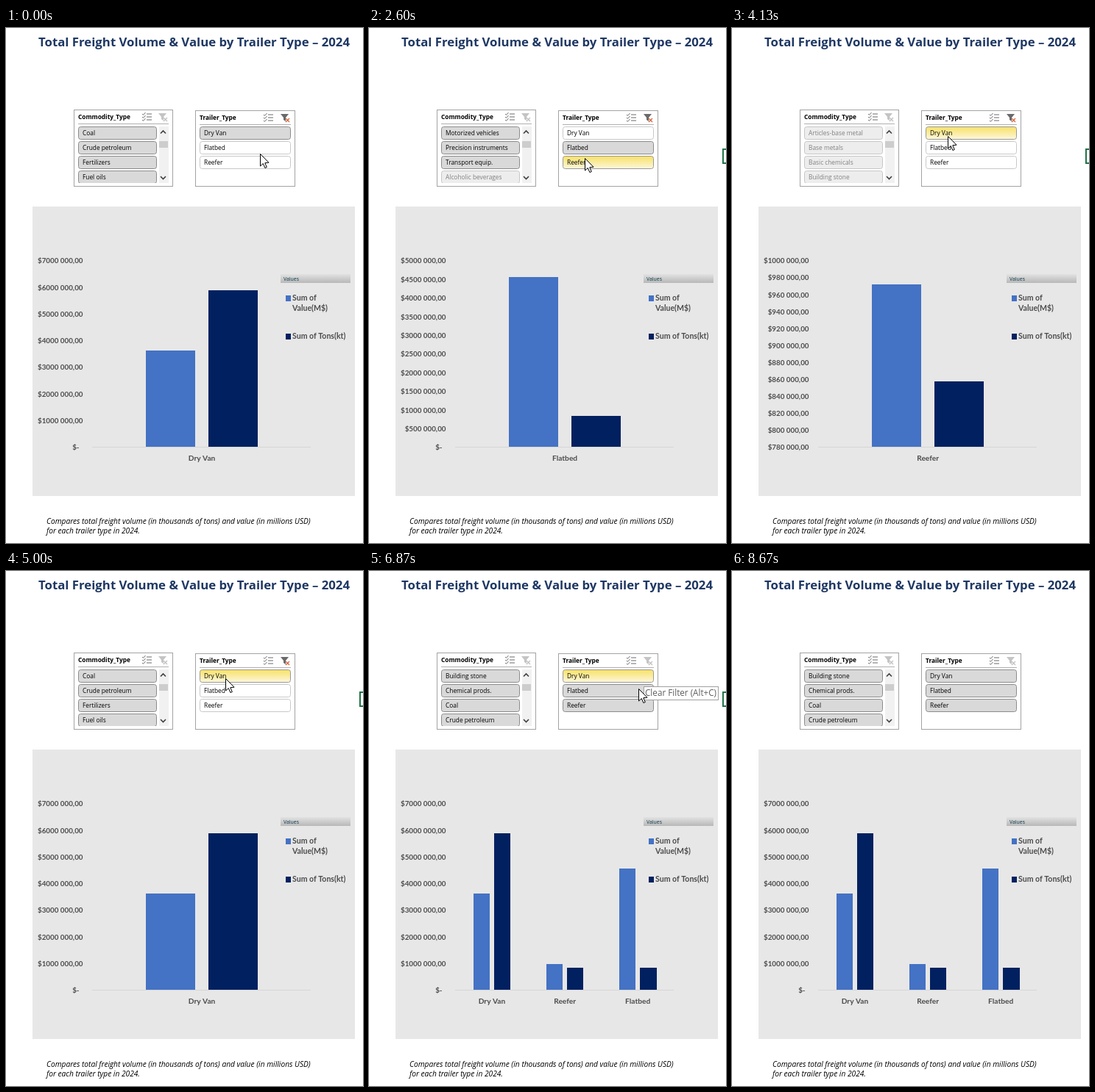
Animation, 485 px wide and 701 px high, one loop 9 s. Source, as an HTML page with a canvas:

```html
<!DOCTYPE html>
<html lang="en">
<head>
<meta charset="utf-8">
<title>Freight by trailer type</title>
<style>
html, body { margin: 0; width: 100%; height: 100%; overflow: hidden; background: #fff; }
canvas { display: block; width: 485px; height: 701px; }
</style>
</head>
<body>
<canvas id="stage"></canvas>
<script>
const W = 485, H = 701, LOOP = 9000, FPS = 15;
const canvas = document.getElementById('stage');
const ctx = canvas.getContext('2d');
const dpr = window.devicePixelRatio || 1;
canvas.width = W * dpr;
canvas.height = H * dpr;

const SANS = '"Open Sans", "Noto Sans", sans-serif';
const CHART = 'Lato, "Open Sans", sans-serif';
const BLUE = '#4472c4', NAVY = '#002060';
const TYPES = ['Dry Van', 'Flatbed', 'Reefer'];

// Values in thousands: [value, tons]
const SUMS = { 'Dry Van': [3624, 5884], Flatbed: [4557, 837], Reefer: [972, 857.5] };

const VIEWS = {
  dry: { cats: ['Dry Van'], min: 0, max: 7000, step: 1000, active: 4,
    goods: ['Coal', 'Crude petroleum', 'Fertilizers', 'Fuel oils'] },
  flat: { cats: ['Flatbed'], min: 0, max: 5000, step: 500, active: 3,
    goods: ['Motorized vehicles', 'Precision instruments', 'Transport equip.', 'Alcoholic beverages'] },
  reefer: { cats: ['Reefer'], min: 780, max: 1000, step: 20, active: 0,
    goods: ['Articles-base metal', 'Base metals', 'Basic chemicals', 'Building stone'] },
  all: { cats: ['Dry Van', 'Reefer', 'Flatbed'], min: 0, max: 7000, step: 1000, active: 4,
    goods: ['Building stone', 'Chemical prods.', 'Coal', 'Crude petroleum'] }
};

// Each click: tick, chosen types, resulting view (shown three ticks later)
const CLICKS = [
  { at: -9, pick: [0], view: 'dry' },
  { at: 21, pick: [1], view: 'flat' },
  { at: 43, pick: [2], view: 'reefer' },
  { at: 60, pick: [0], view: 'dry' },
  { at: 89, pick: [0, 1, 2], view: 'all' }
];

// Pointer stops: tick, x, y, eased
const PATH = [
  [0, 345, 171], [12, 293, 161, 1], [35, 293, 161], [38, 293, 177, 1],
  [50, 293, 177], [57, 293, 147, 1], [73, 293, 147], [87, 377, 123, 1],
  [100, 377, 123], [103, 366, 160], [119, 236, 676]
];
const POINTER_GONE = 120;

const lastClick = n => CLICKS.filter(c => c.at <= n).pop();

function pointerAt(n) {
  if (n <= 0) return { x: PATH[0][1], y: PATH[0][2] };
  for (let i = 1; i < PATH.length; i++) {
    const [a, ax, ay] = PATH[i - 1], [b, bx, by, eased] = PATH[i];
    if (n > b) continue;
    let k = (n - a) / (b - a);
    if (eased) k = k * k * (3 - 2 * k);
    return { x: ax + (bx - ax) * k, y: ay + (by - ay) * k };
  }
  return { x: -99, y: -99 };
}

function text(str, x, y, font, color, align = 'left') {
  ctx.font = font;
  ctx.fillStyle = color;
  ctx.textAlign = align;
  ctx.fillText(str, x, y);
}

function rect(x, y, w, h, color) {
  ctx.fillStyle = color;
  ctx.fillRect(x, y, w, h);
}

function frame(x, y, w, h, color) {
  ctx.strokeStyle = color;
  ctx.lineWidth = 1;
  ctx.strokeRect(x + 0.5, y + 0.5, w - 1, h - 1);
}

function line(points, color, width = 1) {
  ctx.beginPath();
  points.forEach(([x, y]) => ctx.lineTo(x, y));
  ctx.strokeStyle = color;
  ctx.lineWidth = width;
  ctx.stroke();
}

function polygon(points, color) {
  ctx.beginPath();
  points.forEach(([x, y]) => ctx.lineTo(x, y));
  ctx.closePath();
  ctx.fillStyle = color;
  ctx.fill();
}

function fade(y0, y1, from, to) {
  const g = ctx.createLinearGradient(0, y0, 0, y1);
  g.addColorStop(0, from);
  g.addColorStop(1, to);
  return g;
}

const LOOKS = {
  on: ['#d9d9d9', '#8c8c8c', '#000'],
  off: ['#fff', '#c8c8c8', '#000'],
  empty: ['#ededed', '#c6c6c6', '#808080'],
  hover: [null, '#999', '#000']
};

function button(label, x, y, w, look) {
  const [fill, edge, ink] = LOOKS[look];
  ctx.beginPath();
  ctx.roundRect(x + 0.5, y + 0.5, w - 1, 17, 3);
  ctx.fillStyle = fill || fade(y, y + 18, '#f8e162', '#fcf7e0');
  ctx.fill();
  ctx.strokeStyle = edge;
  ctx.lineWidth = 1;
  ctx.stroke();
  text(label, x + 6, y + 12, '8.35px ' + SANS, ink);
}

function checklistIcon(x, y) {
  for (let i = 0; i < 3; i++) {
    const cy = y + 2 + i * 4;
    line([[x, cy], [x + 1.5, cy + 1.3], [x + 4.5, cy - 2]], '#6a6a6a');
    rect(x + 6, cy - 0.5, 7, 1, '#6a6a6a');
  }
}

function funnelIcon(x, y, enabled) {
  const body = enabled ? '#6a6a6a' : '#c4c4c4', cross = enabled ? '#d86a45' : '#c4c4c4';
  polygon([[x, y], [x + 11, y], [x + 7, y + 5], [x + 7, y + 10], [x + 4, y + 8], [x + 4, y + 5]], body);
  line([[x + 7, y + 6], [x + 12, y + 11]], cross, 1.4);
  line([[x + 12, y + 6], [x + 7, y + 11]], cross, 1.4);
}

function slicer(title, x, y, w, h) {
  rect(x, y, w, h, '#fff');
  frame(x, y, w, h, '#a3a3a3');
  text(title, x + 6, y + 13, 'bold 8.3px ' + SANS, '#000');
  rect(x + 6, y + 19, w - 12, 1, '#b0b0b0');
  checklistIcon(x + 93, y + 4);
}

function goodsSlicer(view) {
  slicer('Commodity_Type', 92, 111, 135, 105);
  funnelIcon(207, 116, false);
  ctx.save();
  ctx.beginPath();
  ctx.rect(93, 132, 133, 79);
  ctx.clip();
  view.goods.forEach((g, i) => button(g, 98, 134 + i * 20, 107, i < view.active ? 'on' : 'empty'));
  ctx.restore();
  rect(208, 134, 13, 77, '#f1f1f1');
  rect(208, 154, 12, 9, '#cdcdcd');
  line([[210, 143.5], [213.5, 140], [217, 143.5]], '#404040', 1.6);
  line([[210, 202], [213.5, 205.5], [217, 202]], '#404040', 1.6);
}

function typeSlicer(n, picked, filtered) {
  slicer('Trailer_Type', 257, 112, 136, 104);
  const p = pointerAt(n);
  if (filtered && p.x >= 370 && p.x < 387 && p.y >= 114 && p.y < 130) {
    rect(370, 114, 17, 16, fade(114, 130, '#f9e48a', '#fff0b8'));
    frame(370, 114, 17, 16, '#a8a083');
  }
  funnelIcon(373, 117, filtered);
  // Hover trails the pointer by one tick
  const q = pointerAt(n - 1);
  TYPES.forEach((name, i) => {
    const y = 134 + i * 20;
    const over = q.x >= 263 && q.x < 387 && q.y >= y && q.y < y + 17;
    button(name, 263, y, 124, over ? 'hover' : picked.includes(i) ? 'on' : 'off');
  });
}

function money(v) {
  return v ? '$' + v + ' 000,00' : '$-';
}

function chart(view) {
  const base = 570.75, span = 254, ink = '#4c4c4c';
  rect(36, 243, 438, 394, '#e7e7e7');
  const yOf = v => base - (v - view.min) / (view.max - view.min) * span;

  for (let v = view.min; v <= view.max; v += view.step)
    text(money(v), v ? 104.5 : 99.5, yOf(v) + 3.6, 'bold 9.8px ' + CHART, ink, 'right');

  rect(117, 570, 297, 1, '#d6d6d6');
  const many = view.cats.length > 1;
  const slot = 297.3 / view.cats.length;
  const barW = many ? 22.4 : 67, gap = many ? 6 : 18;
  view.cats.forEach((name, i) => {
    const mid = 117.4 + slot * (i + 0.5);
    SUMS[name].forEach((v, s) => {
      const edge = s ? mid + gap / 2 : mid - gap / 2 - barW;
      const x = Math.round(edge), top = Math.round(yOf(v));
      rect(x, top, Math.round(edge + barW) - x, 570 - top, s ? NAVY : BLUE);
    });
    text(name, mid, 589.3, 'bold 10.2px ' + CHART, ink, 'center');
  });

  rect(373, 335, 95, 12, fade(335, 347, '#e2e2e2', '#b8b8b8'));
  text('Values', 377, 344, '6.9px ' + SANS, '#0b3a4a');
  const font = 'bold 10.55px ' + CHART;
  rect(380, 364, 7, 8, BLUE);
  text('Sum of', 389, 371.3, font, ink);
  text('Value(M$)', 389, 385.3, font, ink);
  rect(380, 416, 7, 8, NAVY);
  text('Sum of Tons(kt)', 389, 423.3, font, ink);
}

function tooltip() {
  rect(373, 157, 102, 19, '#fff');
  frame(373, 157, 102, 19, '#a0a0a0');
  text('Clear Filter (Alt+C)', 375, 170.3, '11.7px ' + SANS, '#5f5f5f');
}

function arrow(x, y) {
  const shape = [[0, 0], [0, 16.5], [3.8, 13], [6.4, 19], [8.8, 18], [6.3, 12.2], [11.5, 11.7]]
    .map(([dx, dy]) => [x + 0.5 + dx, y + 0.5 + dy]);
  polygon(shape, '#fff');
  line([...shape, shape[0]], '#000');
}

function spinner(x, y, turn) {
  const ring = (from, to, color) => {
    ctx.beginPath();
    ctx.arc(x, y, 7, from, to);
    ctx.strokeStyle = color;
    ctx.lineWidth = 4.8;
    ctx.stroke();
  };
  ring(0, Math.PI * 2, '#1e88e0');
  ring(turn, turn + 1.3, '#52b0f5');
}

function draw(ms) {
  // Ticks fall on 10 ms steps, so allow for the rounding
  const n = Math.floor((ms + 5) * FPS / 1000);
  const click = lastClick(n);
  const view = VIEWS[lastClick(n - 3).view];

  ctx.setTransform(dpr, 0, 0, dpr, 0, 0);
  rect(0, 0, W, H, '#fff');
  text('Total Freight Volume & Value by Trailer Type – 2024', 44, 25, 'bold 16.8px ' + SANS, '#1f3864');

  goodsSlicer(view);
  typeSlicer(n, click.pick, view !== VIEWS.all);
  chart(view);

  const note = 'italic 500 10.2px ' + SANS;
  text('Compares total freight volume (in thousands of tons) and value (in millions USD)', 55, 675, note, '#000');
  text('for each trailer type in 2024.', 55, 688, note, '#000');

  if (n >= 1 && n < 130) {
    ctx.strokeStyle = '#217346';
    ctx.lineWidth = 2;
    ctx.strokeRect(481, 165, 20, 19);
  }
  if (n >= 101 && n < 117) tooltip();
  if (n < POINTER_GONE) {
    const p = pointerAt(n), since = n - click.at;
    if (since < 2) spinner(p.x - 0.5, p.y + 0.5, since * 1.2 - 1);
    else arrow(Math.round(p.x), Math.round(p.y));
  }
}

const start = performance.now();
function tick() {
  draw((performance.now() - start) % LOOP);
  requestAnimationFrame(tick);
}
tick();
</script>
</body>
</html>
```
